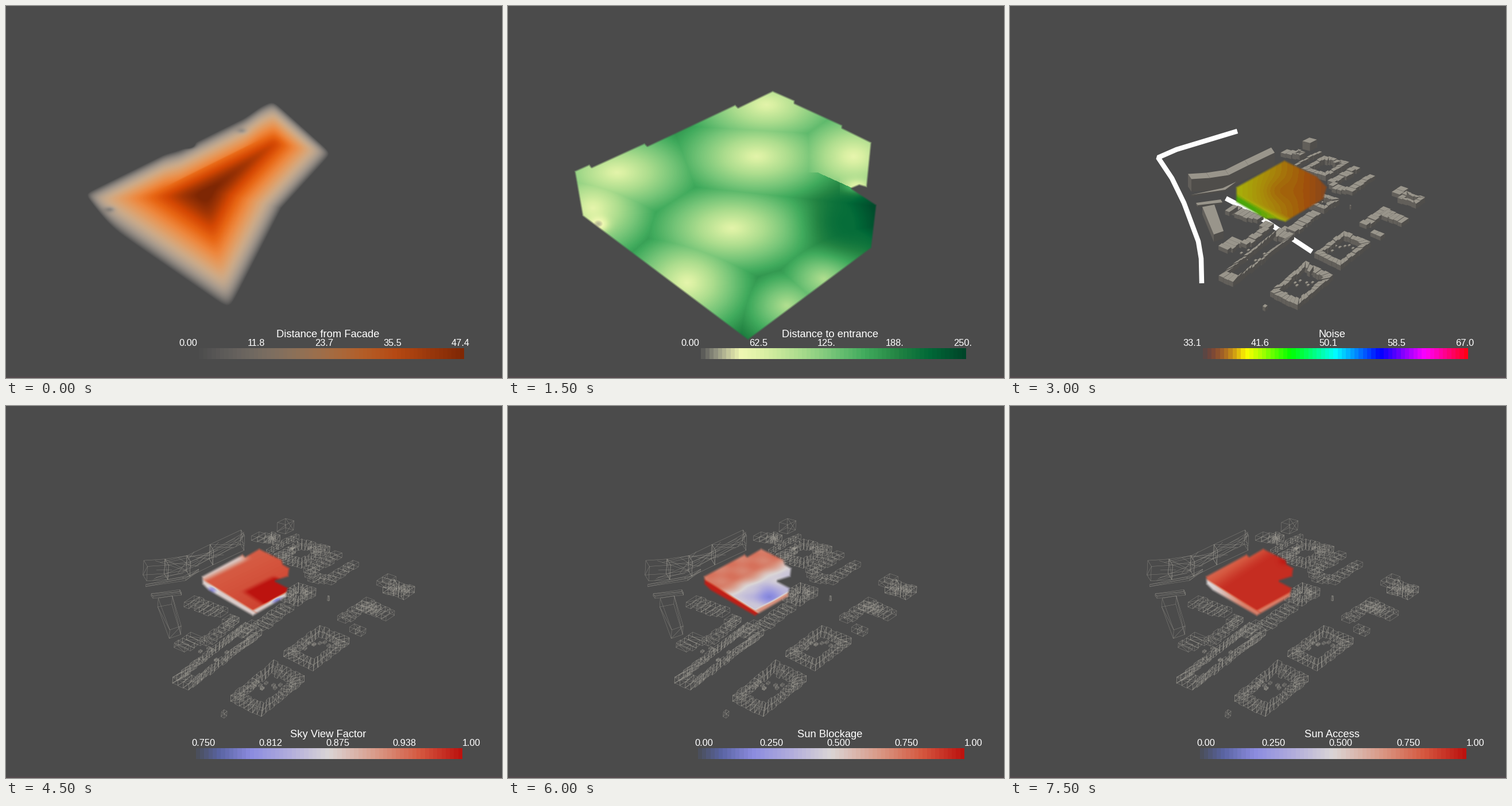
Write a matplotlib script that moves like this. It is 864 px wide and 648 px high and loops after 9000 ms.

```python
import random

import matplotlib.pyplot as plt
import numpy as np
from matplotlib.animation import FuncAnimation
from matplotlib.collections import LineCollection, PolyCollection
from matplotlib.colors import LinearSegmentedColormap
from matplotlib.path import Path

W, H = 864, 648
BG = np.array([75, 75, 75]) / 255
rng = random.Random(12)

fig = plt.figure(figsize=(W / 72, H / 72), dpi=72, facecolor=BG)
ax = fig.add_axes([0, 0, 1, 1])
X, Y = np.meshgrid(np.arange(W) + 0.5, np.arange(H) + 0.5)


# ---------- fields ----------
def smooth(v):
    v = np.clip(v, 0, 1)
    return v * v * (3 - 2 * v)


def bump(x, y, rx, ry):
    return np.exp(-((X - x) / rx) ** 2 - ((Y - y) / ry) ** 2)


def plane(p, q, scale=1):
    """Scaled distance from the line p-q, positive on its right-hand side."""
    dx, dy = q[0] - p[0], q[1] - p[1]
    return (dx * (Y - p[1]) - dy * (X - p[0])) / np.hypot(dx, dy) / scale


def signed(pts):
    """Signed pixel distance to a polygon, positive inside."""
    pts = np.array(pts, float)
    best = np.full(X.shape, 1e9)
    for (px, py), (qx, qy) in zip(pts, np.roll(pts, -1, 0)):
        dx, dy = qx - px, qy - py
        t = np.clip(((X - px) * dx + (Y - py) * dy) / (dx * dx + dy * dy), 0, 1)
        best = np.minimum(best, np.hypot(X - px - t * dx, Y - py - t * dy))
    inside = Path(pts).contains_points(np.c_[X.ravel(), Y.ravel()])
    return np.where(inside.reshape(X.shape), best, -best)


def soft_min(fields, k=20):
    return -np.log(sum(np.exp(-k * np.clip(f, -3, 3)) for f in fields)) / k


def rgba(rgb, alpha):
    return np.dstack([rgb[..., :3], np.clip(alpha, 0, 1)])


# ---------- colour maps ----------
def faded(name, reach):
    """Colour map over the background with opacity rising up to `reach`."""
    t = np.linspace(0, 1, 64)
    a = np.clip(t / reach, 0, 1)[:, None]
    return plt.get_cmap(name)(t)[:, :3] * a + BG * (1 - a)


SKY = LinearSegmentedColormap.from_list("sky", [
    (0, "#4b4f5c"), (0.08, "#5a64a2"), (0.2, "#8c8ce0"), (0.35, "#b2addc"),
    (0.5, "#dbd6d6"), (0.7, "#d9937f"), (0.85, "#d5573f"), (1, "#bc130f")])
LOUD = LinearSegmentedColormap.from_list("loud", [
    "#4aa608", "#a8ac0a", "#a8860b", "#a0500c", "#74412a"])


# ---------- scene parts ----------
def picture(img, z=4):
    return ax.imshow(img, extent=(0, W, H, 0), aspect="auto",
                     interpolation="nearest", zorder=z)


def legend(title, labels, colors, first=317, last=792, span=(329, 798)):
    parts = [ax.imshow(colors[None], extent=(*span, 615, 596), aspect="auto",
                       interpolation="nearest", zorder=6)]
    style = dict(color="white", fontname="Liberation Sans", ha="center",
                 va="baseline", zorder=7)
    parts.append(ax.text(561, 577, title, fontsize=18.4, **style))
    for x, s in zip(np.linspace(first, last, 5), labels.split()):
        parts.append(ax.text(x, 592, s, fontsize=16.4, **style))
    return parts


# ---------- city ----------
boxes = []


def box(quad, h):
    boxes.append((np.array(quad, float), h))


def block(x, y, a, b):
    """Street-aligned parallelogram; a and b are its extents along both axes."""
    u = np.array([1, 0.3 + 0.0009 * (y - 270)]) * a / 2
    v = np.array([-1, 0.55 + 0.0014 * (y - 270)]) * b / 2
    c = np.array([x, y])
    return np.array([c - u - v, c + u - v, c + u + v, c - u + v])


def cells(p, q, p2, q2, h):
    """Terrace of small houses between the edges p-q and p2-q2."""
    n = max(1, round(np.hypot(*(q - p)) / 8))
    for s, e in zip(np.arange(n) / n, np.arange(1, n + 1) / n):
        lift = np.array([0, rng.uniform(-1.4, 1.4)])
        deep = rng.uniform(0.8, 1.15)
        o1, o2 = p + (q - p) * s, p + (q - p) * e
        i1, i2 = p2 + (q2 - p2) * s, p2 + (q2 - p2) * e
        box(np.array([o1, o2, o2 + (i2 - o2) * deep, o1 + (i1 - o1) * deep]) + lift, h)


def row(x, y, a, b, h=7):
    c = block(x, y, a, b)
    if a > b:
        cells(c[0], c[1], c[3], c[2], h)
    else:
        cells(c[0], c[3], c[1], c[2], h)


def yard(x, y, a, b, h=9):
    c = block(x, y, a, b)
    m = c.mean(0)
    inner = c + (m - c) * min(0.6, 20 / (a + b) + 0.1)
    for i in range(4):
        j = (i + 1) % 4
        cells(c[i], c[j], inner[i], inner[j], h)
    for _ in range(int(a * b / 300)):
        box(block(x + rng.uniform(-.2, .2) * (a + b), y + rng.uniform(-.12, .12) * (a + b) * .6, 3, 3), 2)


def build_city():
    bend = [(313, 297), (345, 295), (378, 290), (412, 273), (458, 251)]
    for p, q in zip(bend, bend[1:]):
        w = np.array([3, 4.5])
        box([p - w, q - w, q + w, p + w], 22)
    box([(315, 329), (371, 317), (394, 306), (375, 320)], 3)
    box([(324, 343), (367, 337), (370, 342), (327, 347)], 3)
    box([(335, 350), (356, 346), (372, 392), (355, 398)], 13)
    box(block(522, 234, 13, 12), 14)

    for place in ((429, 434, 25, 106), (508, 483, 48, 62), (579, 421, 46, 52), (549, 278, 43, 41),
                  (699, 333, 32, 16), (503, 255, 13, 10), (547, 340, 27, 26)):
        yard(*place)
    for place in ((636, 366, 13, 42), (670, 366, 36, 13), (655, 362, 30, 9), (640, 395, 18, 7),
                  (582, 293, 12, 46), (611, 308, 11, 43), (574, 315, 30, 10), (519, 264, 4, 44),
                  (512, 374, 15, 46), (473, 392, 11, 22), (409, 360, 52, 13), (431, 397, 11, 48),
                  (446, 381, 14, 13), (385, 414, 20, 24), (486, 255, 19, 12), (680, 321, 14, 16),
                  (444, 522, 4, 4), (593, 346, 2, 1)):
        row(*place)


def solid_city():
    polys, colors = [], []
    for quad, h in sorted(boxes, key=lambda b: b[0][:, 1].max() + b[1]):
        base = quad + (0, h)
        sides = []
        for i in range(4):
            j = (i + 1) % 4
            d = quad[j] - quad[i]
            tone = "#625f5a" if d[0] * d[1] > 0 else "#4f4d4a"
            sides.append((quad[i, 1] + quad[j, 1], [quad[i], quad[j], base[j], base[i]], tone))
        for _, poly, tone in sorted(sides, key=lambda s: s[0]):
            polys.append(poly)
            colors.append(tone)
        polys.append(quad)
        colors.append("#99958b")
    return ax.add_collection(PolyCollection(polys, facecolors=colors, edgecolors="none", zorder=3))


def wire_city():
    segs = []

    def view(p):
        x, y = p[..., 0], p[..., 1]
        return np.stack([1.149 * x - 0.062 * y - 98, 1.1475 * y - 0.003 * x - 65.6], -1)

    def slab(t, s):
        return 242 + 173 * t, 266 - 49 * t ** 1.7 + s * (44 - 18 * t)

    for quad, h in boxes:
        top, low = view(quad), view(quad + (0, h))
        for i in range(4):
            j = (i + 1) % 4
            segs += [(top[i], top[j]), (low[i], low[j]), (top[i], low[i])]
            if rng.random() < 0.5:
                segs.append((top[i], low[j]))
    # long triangles of the curved slab
    for _ in range(26):
        t = rng.random()
        segs.append((slab(t, rng.random()), slab(min(1, t + rng.uniform(.05, .5)), rng.random())))
    return ax.add_collection(LineCollection(segs, colors="#a8a59c", linewidths=0.5,
                                            alpha=0.62, zorder=2))


# ---------- scenes ----------
def facade():
    v = 1.07 * soft_min([
        plane((140, 326), (388, 203), 92),
        plane((484, 182), (562, 252), 72),
        np.maximum(plane((560, 264), (480, 352), 115), plane((480, 352), (390, 527), 127)),
        plane((390, 529), (148, 362), 138),
        plane((180, 385), (136, 326), 75)])
    ridge = smooth(-plane((285, 311), (432, 238)) / 3 + 0.5)
    v = v - 0.06 * ridge * smooth((X - 270) / 40) * smooth((450 - X) / 40)
    for x, y in ((320, 243), (412, 218), (182, 354)):
        v = v - 0.1 * bump(x, y, 9, 5)
    v = np.clip(v, 0, 1)
    return [picture(rgba(plt.get_cmap("Oranges")(v), 1 - np.exp(-5 * v)))] + legend(
        "Distance from Facade", "0.00 11.8 23.7 35.5 47.4", faded("Oranges", 1))


def entrance():
    shape = [(115, 287), (142, 275), (146, 280), (238, 238), (243, 243), (396, 171), (401, 176),
             (461, 147), (500, 164), (500, 169), (583, 207), (583, 212), (634, 237), (626, 317),
             (612, 313), (600, 318), (643, 346), (634, 422), (418, 583), (129, 366)]

    def nearest(spots, rx, ry, base):
        return np.minimum.reduce([base + 0.31 * np.hypot((X - x) / rx, (Y - y) / ry)
                                  for x, y in spots])

    v = np.minimum.reduce([
        nearest([(450, 172), (433, 262), (190, 290), (390, 387)], 103, 57, 0.21),
        nearest([(148, 352), (312, 482)], 78, 64, 0.2),
        nearest([(486, 522), (550, 475)], 75, 60, 0.36)])
    upper = Y < 297 + np.maximum(X - 555, -15) * 0.45
    v = np.where(upper, np.minimum(v, nearest([(602, 262)], 82, 60, 0.19)), v)
    corner = bump(592, 378, 60, 50) * ~upper
    v = v * (1 - corner) + corner * np.clip(v, 0.85, 0.97)
    v = v - 0.24 * bump(158, 381, 16, 12) - 0.24 * bump(608, 315, 24, 12) * (X > 578)
    v = np.clip(v, 0, 1)
    alpha = np.clip(signed(shape) / 3.5, 0, 1) * np.clip(v / 0.16, 0, 1)
    return [picture(rgba(plt.get_cmap("YlGn")(v), alpha))] + legend(
        "Distance to entrance", "0.00 62.5 125. 188. 250.", faded("YlGn", 0.16))


def noise():
    shape = [(393, 315), (478, 268), (535, 296), (553, 315), (547, 337), (480, 377),
             (462, 372), (445, 372), (393, 342)]
    side = smooth(plane((393, 324), (478, 362)) / 14)
    t = 0.22 + 0.68 * (X - 393) / 160 - 0.35 * side
    t = t + 0.1 * bump(465, 322, 30, 20)
    t = np.round(np.clip(t, 0, 1) * 24) / 24
    parts = [picture(rgba(LOUD(t), smooth(signed(shape) / 6 + 0.25)))]
    for road in (((396, 218), (290, 250), (258, 264), (282, 300), (303, 343), (328, 410),
                  (333, 440), (334, 483)), ((376, 335), (420, 358), (526, 428))):
        parts += ax.plot(*zip(*road), color="white", lw=8.5, solid_capstyle="butt",
                         solid_joinstyle="bevel", zorder=2)
    parts.append(solid_city())
    return parts + legend("Noise", "33.1 41.6 50.1 58.5 67.0", faded("hsv", 0.17))


def climates():
    shape = [(340, 296), (412, 257), (417, 261), (441, 247), (481, 267), (484, 275), (495, 282),
             (493, 298), (471, 305), (492, 316), (489, 333), (430, 367), (352, 322), (341, 311)]
    mask = smooth(signed(shape) / 7 + 0.22)
    # roof coordinates: u along the back edge, v towards the front
    dx, dy = X - 341, Y - 297
    u = (55 * dx - 89 * dy) / 9861
    v = (49 * dx + 100 * dy) / 9861
    left = smooth(plane((341, 300), (430, 355)) / 6 + 0.3)
    right = smooth(plane((430, 355), (492, 321)) / 6 + 0.3)

    def faces(roof, left_t, right_t):
        t = roof + (left_t - roof) * left
        return t + (right_t - t) * right * (1 - left)

    pale = (1 - smooth(v / 0.16)) * (1 - smooth((u - 0.62) / 0.2))
    dark = smooth((u - 0.1) / 0.14) * smooth((0.76 - u) / 0.1) * smooth((v - 0.56) / 0.14)
    sky = faces(0.83 + 0.06 * v - 0.28 * pale + 0.13 * dark,
                0.53 - 0.3 * bump(358, 321, 8, 6), 0.54 - 0.34 * bump(473, 339, 10, 7))
    patches = 0.025 * np.sin(17 * u) * np.cos(13 * v)
    block_t = faces(0.76 + patches - 0.3 * smooth((v - 0.3) / 0.35) - 0.26 * bump(456, 331, 27, 15),
                    0.97, 0.7)
    access = faces(0.82 + 0.12 * smooth((v + 0.15 * u) / 0.4) + 0.04 * bump(478, 270, 10, 8),
                   0.5 + 0.25 * smooth((X - 345) / 70), 0.76)

    wires = wire_city()
    quarters = "0.00 0.250 0.500 0.750 1.00"
    bar = SKY(np.linspace(0, 1, 64))[:, :3]
    scenes = []
    for title, labels, t, first in (
            ("Sky View Factor", "0.750 0.812 0.875 0.938 1.00", sky, 344),
            ("Sun Blockage", quarters, block_t, 341), ("Sun Access", quarters, access, 341)):
        scenes.append([picture(rgba(SKY(np.clip(t, 0, 1)), mask)), wires]
                      + legend(title, labels, bar, first, 811, (331, 795)))
    return scenes


build_city()
scenes = [facade(), entrance(), noise()] + climates()
ax.axhline(647, color="#554b4e", lw=2, zorder=1)
ax.set_xlim(0, W)
ax.set_ylim(H, 0)
ax.axis("off")


def show(i):
    for parts in scenes:
        for part in parts:
            part.set_visible(False)
    for part in scenes[i]:
        part.set_visible(True)
    return []


anim = FuncAnimation(fig, show, frames=len(scenes), init_func=lambda: show(0),
                     interval=1500, repeat=True, repeat_delay=0)
plt.show()
```
